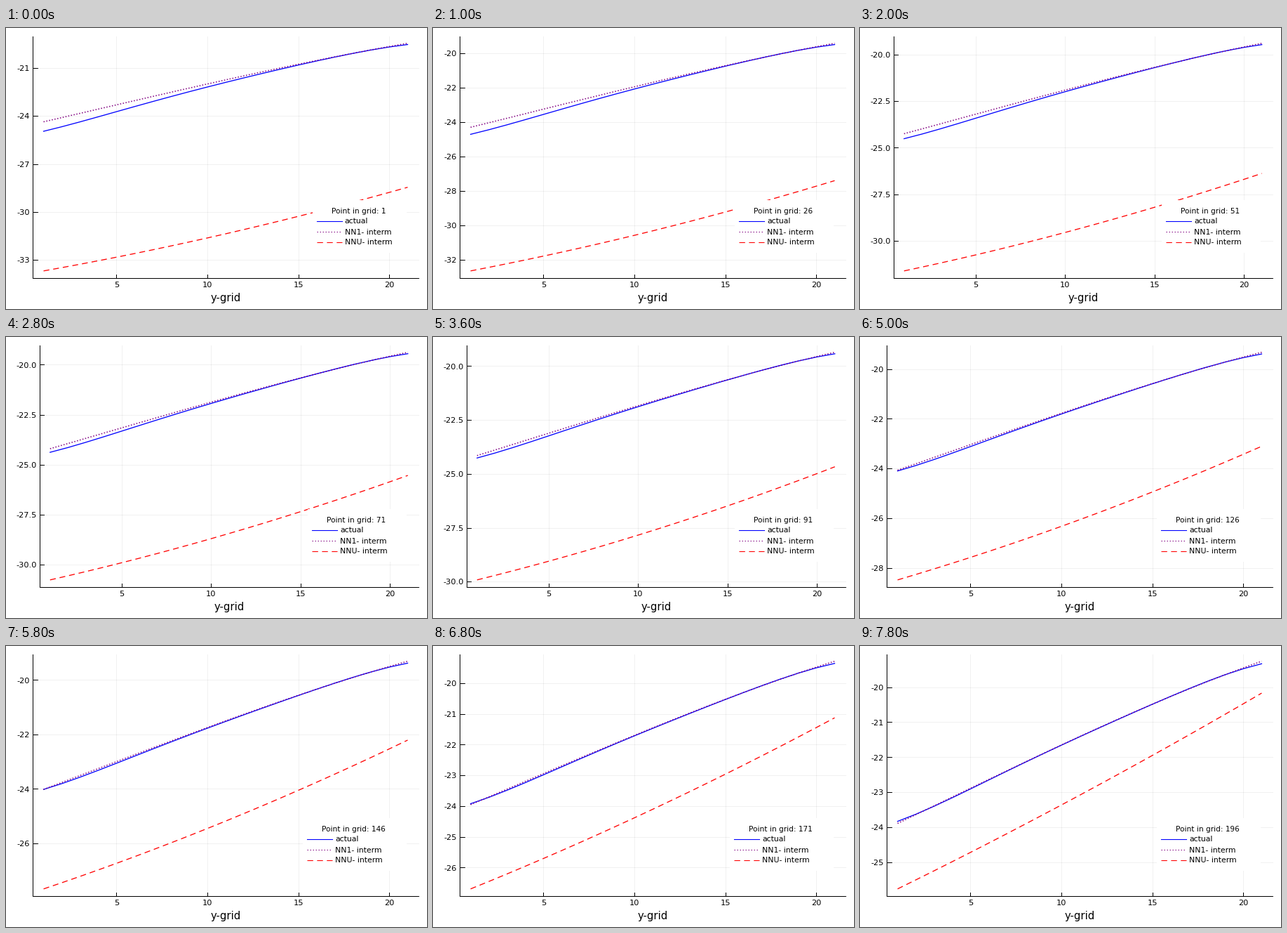
Animation of 600x400 px, one loop 8000 ms. Source, as a matplotlib script:

```python
import numpy as np
import matplotlib.pyplot as plt
from matplotlib.animation import FuncAnimation
from matplotlib.patches import Rectangle
from numpy.polynomial.polynomial import polyval

W, H, DPI = 600, 400, 100
PT = 72 / DPI                      # points per pixel
FRAMES, INTERVAL = 40, 200
TOP, BOTTOM, RIGHT = 12, 355.5, 588
GRID = np.arange(1, 22)
U = (GRID - 1) / 20                # position along a curve, 0 to 1
V = 2 * U - 1

plt.rcParams["font.family"] = "DejaVu Sans"
plt.rcParams["lines.scale_dashes"] = False


def bowed(start, end, bow):
    """Straight run from start to end, bent between its fixed ends."""
    return start + (end - start) * U + bow * U * (1 - U)


def actual(t):
    return bowed(polyval(t, [-24.956, 2.063, -1.478, 0.541]),
                 polyval(t, [-19.527, 0.214, -0.02]),
                 0.66 + 0.516 * V + 0.9 * V ** 3 + 0.72 * (1 - t) ** 2)


def nn1(t):
    return bowed(polyval(t, [-24.363, 0.437, 0.038]),
                 -19.448 + 0.186 * t,
                 0.66 + 0.3 * V)


def nnu(t):
    return bowed(polyval(t, [-33.694, 8.083, 0.508, -0.654]),
                 polyval(t, [-28.46, 8.478, -2.775, 6.573, -3.987]),
                 0.7 * t ** 4 - 1.18)


def pick_ticks(lo, hi):
    """Best tick step by tick count, coverage and niceness."""
    best, choice = -1, None
    for step, nice in ((1, 1), (2.5, 0.5), (2, 0.7), (3, 0.2)):
        ticks = step * np.arange(np.ceil(lo / step), np.floor(hi / step) + 1)
        n = len(ticks)
        if not 4 <= n <= 8:
            continue
        score = ((1 - abs(n - 5) / 5) / 4 + nice / 4
                 + 0.5 * (hi - lo) / (step * (n - 1)))
        if score > best + 1e-9:
            best, choice = score, (step, ticks)
    return choice


fig = plt.figure(figsize=(W / DPI, H / DPI), dpi=DPI, facecolor="white")
ax = fig.add_axes([0, 0, 1, 1])


def line(x, y, color="black", width=1.0, z=2, **kw):
    ax.plot(x, y, color=color, lw=width * PT, zorder=z, **kw)


def text(x, y, s, size, ha="left"):
    ax.text(x, y, s, fontsize=size * PT, ha=ha, va="baseline", zorder=6)


def dashes(on, off):
    return dict(ls=(0, (on * PT, off * PT)), dash_capstyle="butt")


# name, curve, colour, curve width, key width, dash style
SERIES = (("actual", actual, "blue", 1.3, 1.1, {}),
          ("NN1- interm", nn1, "purple", 1.6, 1.0, dashes(1.5, 2.5)),
          ("NNU- interm", nnu, "red", 1.3, 1.1, dashes(8.3, 5.6)))


def legend(p):
    left = 442.5 - 6.8 * (len(str(p)) - 1)
    ax.add_patch(Rectangle((left - 6, 245), 577 - left, 75,
                           fc="white", ec="none", zorder=4))
    text(541, 263.5, f"Point in grid: {p}", 10.45, "right")
    for i, (name, _, color, _, width, style) in enumerate(SERIES):
        y = 274.5 + 15 * i
        line([left, left + 36], [y, y], color, width, 5, **style)
        text(left + 40.3, y + 4, name, 10.9)


def draw(k):
    p = 1 + 5 * k
    t = k / (FRAMES - 1)
    curves = [f(t) for _, f, *_ in SERIES]
    lo, hi = np.min(curves), np.max(curves)
    pad = 0.03 * (hi - lo)
    lo, hi = lo - pad, hi + pad
    step, ticks = pick_ticks(lo, hi)
    decimals = 1 if step == 2.5 else 0
    left = 47.5 if decimals else 38

    def px(x):
        return left + (x - 0.4) / 21.2 * (RIGHT - left)

    def py(y):
        return TOP + (hi - y) / (hi - lo) * (BOTTOM - TOP)

    ax.clear()
    ax.set_xlim(0, W)
    ax.set_ylim(H, 0)
    ax.axis("off")

    for v in (5, 10, 15, 20):
        x = px(v)
        line([x, x], [TOP, BOTTOM], z=1, alpha=0.055)
        line([x, x], [BOTTOM, BOTTOM - 5])
        text(x, 369.3, str(v), 11.4, "center")
    for v in ticks:
        y = py(v)
        line([left, RIGHT], [y, y], z=1, alpha=0.055)
        line([left, left + 6.5], [y, y])
        text(left - 4, y + 4.2, f"{v:.{decimals}f}", 11.4, "right")
    line([left, left], [TOP, BOTTOM])
    line([left, RIGHT], [BOTTOM, BOTTOM])
    text((left + RIGHT) / 2 + 0.5, 388.7, "y-grid", 14.9, "center")

    for ys, (_, _, color, width, _, style) in zip(curves, SERIES):
        line(px(GRID), py(ys), color, width, 3, **style)
    legend(p)


anim = FuncAnimation(fig, draw, frames=FRAMES, interval=INTERVAL,
                     repeat=True, repeat_delay=0, blit=False)
plt.show()
```
